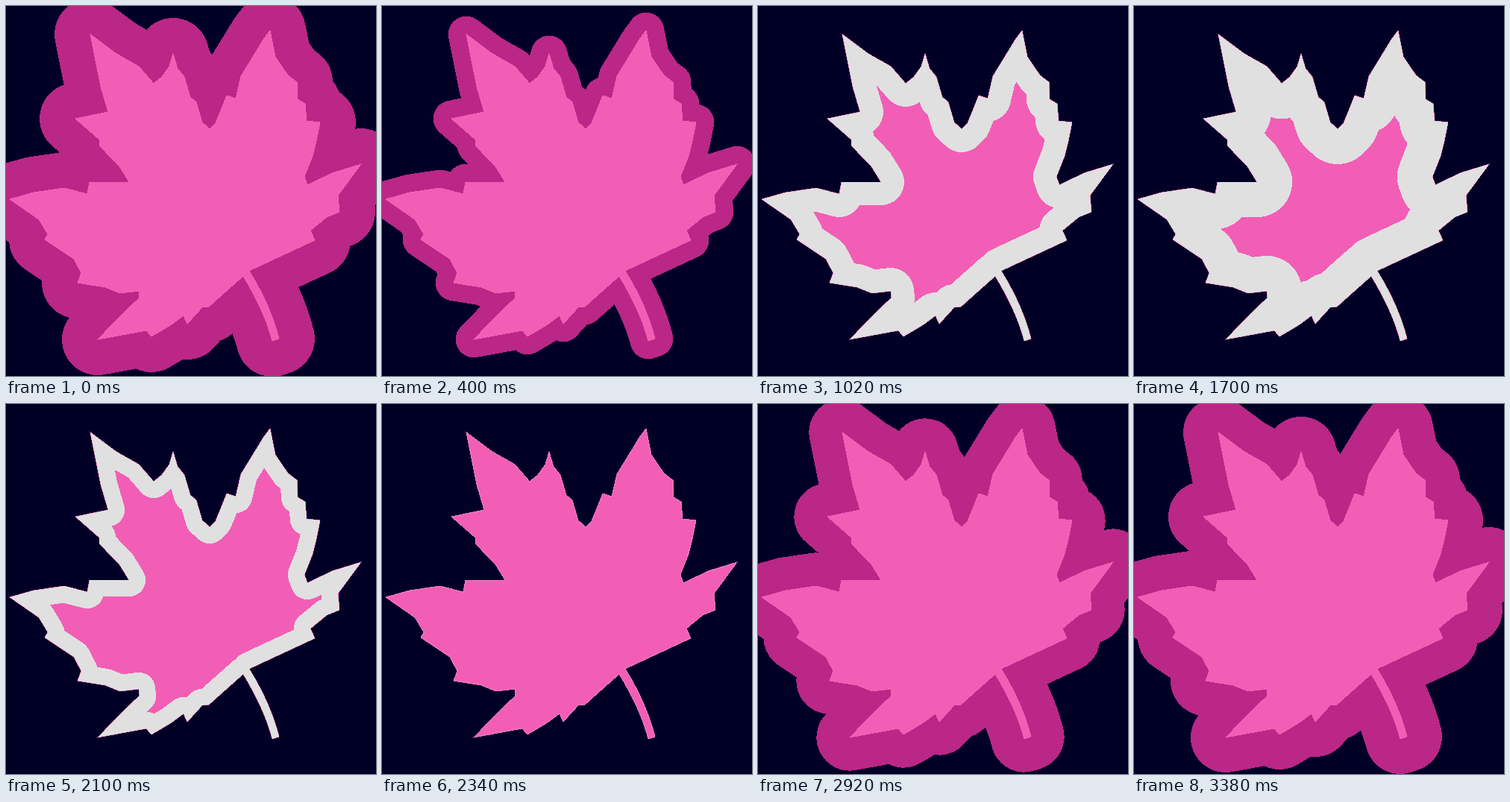
Animation, 496 px wide and 496 px high, one loop 3.4 s. Source, as an HTML page:

```html
<!DOCTYPE html>
<html lang="en">
<head>
<meta charset="utf-8">
<title>Leaf offset</title>
<style>
  html, body { margin: 0; width: 100%; height: 100%; overflow: hidden; background: #000026; }
  svg { display: block; width: 100vw; height: 100vh; shape-rendering: crispEdges; }
  .band { fill: none; stroke-linejoin: round; stroke-width: 0; }
  #outer { stroke: #ba2787; }
  #inner { stroke: #e0e0e0; }
  #body { fill: #f25eb5; stroke: #f25eb5; }
</style>
</head>
<body>
<svg viewBox="0 0 496 496">
  <defs>
    <!-- Tips and notches, clockwise from the upper left tip -->
    <path id="leaf" d="M113 38 L148 64 178 81 198 104 209 95 219 81 224 64 230 84 239 95
      247 122 255 129 263 156 273 165 281 157 296 120 308 124 315 94 345 45 354 33
      361 68 378 93 390 102 391 125 401 131 403 154 421 156 416 181 411 201 400 229
      404 240 437 224 476 212 445 254 447 276 430 283 408 301 414 314 343 347 326 355
      Q355 402 366 446 L357 449 Q347 410 318 362 L272 403 263 404 243 426 238 415
      222 427 195 443 188 435 123 447 157 412 179 391 178 382 153 385 133 377 96 371
      101 358 91 339 52 313 56 306 44 286 5 259 37 250 78 244 109 252 112 236 165 236
      152 215 125 187 125 179 93 151 137 142 127 108 Z"/>
    <clipPath id="inside"><use href="#leaf"/></clipPath>
  </defs>
  <use id="outer" class="band" href="#leaf"/>
  <use id="body" href="#leaf"/>
  <g clip-path="url(#inside)"><use id="inner" class="band" href="#leaf"/></g>
</svg>
<script>
  const outer = document.getElementById('outer');
  const inner = document.getElementById('inner');
  const LOOP = 3400, STEP = 20;
  const REACH = 50.5, PERIOD = 3350, LEAD = 170;

  function draw() {
    const now = performance.now() % LOOP;
    const t = now - now % STEP;
    // The wave is a little shorter than the loop, so it restarts with a small jump
    const offset = REACH * Math.cos(2 * Math.PI * (t + LEAD) / PERIOD);
    outer.style.strokeWidth = 2 * Math.max(0, offset);
    inner.style.strokeWidth = 2 * Math.max(0, -offset);
    requestAnimationFrame(draw);
  }
  draw();
</script>
</body>
</html>
```
